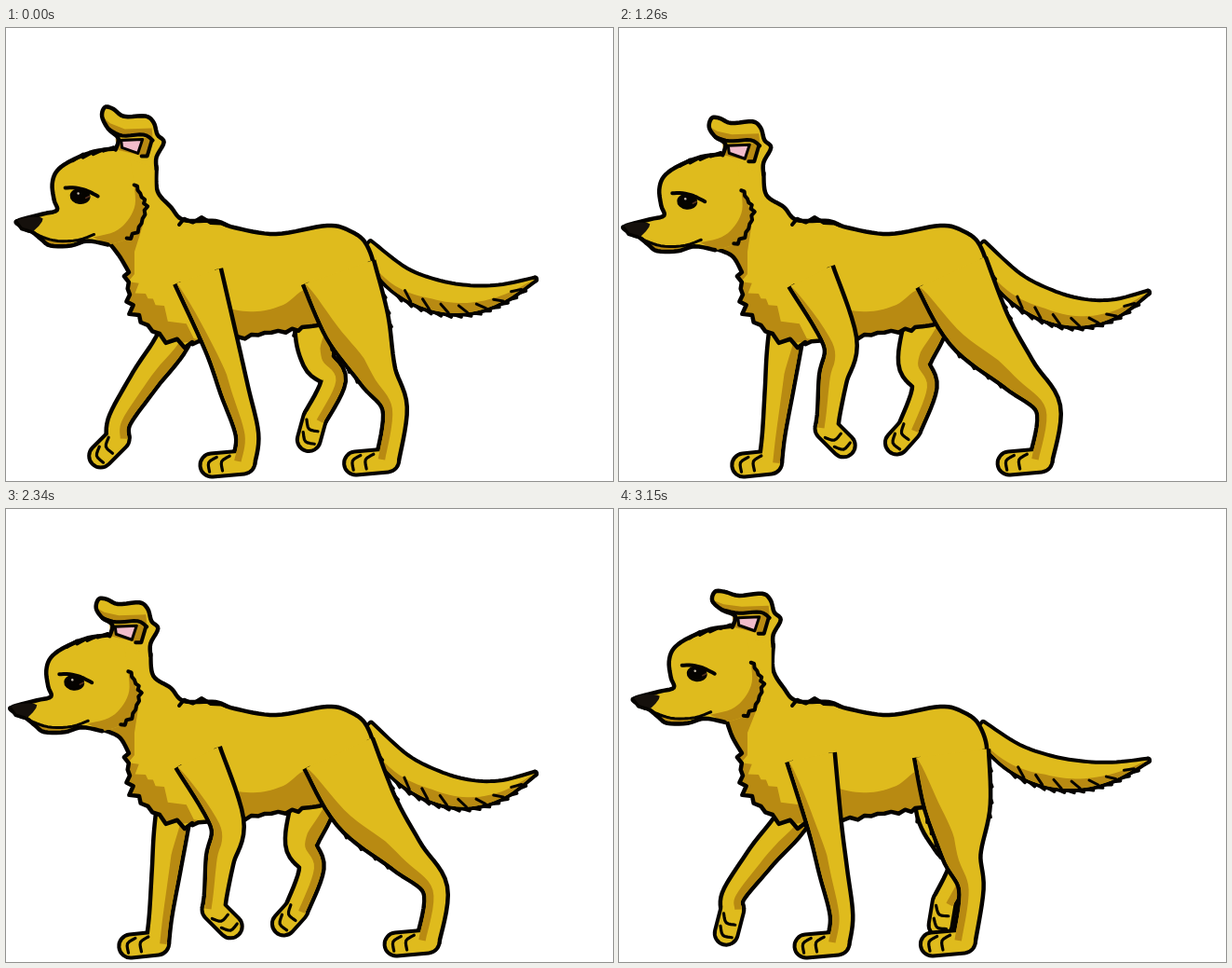
Write an HTML page with a canvas that moves like this. It is 652 px wide and 486 px high and loops after 3.24 s.

```html
<!DOCTYPE html>
<html lang="en">
<head>
<meta charset="utf-8">
<title>Walking dog</title>
<style>
html, body { margin: 0; width: 100%; height: 100%; overflow: hidden; background: #fff; }
canvas { display: block; }
</style>
</head>
<body>
<canvas id="stage" width="652" height="486"></canvas>
<script>
const ctx = document.getElementById('stage').getContext('2d');
const GOLD = '#dfbb1d', SHADE = '#b88a12', INK = '#050300', PINK = '#f2bccb';
const STEP = 90, CYCLE = 12, FRAMES = 36;
const { PI, sin, cos } = Math;

// Cosine that peaks at the given step of the walk.
const wave = (k, peak, period = CYCLE) => cos(2 * PI * (k - peak) / period);

// Five steps on the ground, seven in the air.
function gait(k, landing) {
  const p = (k - landing + CYCLE) % CYCLE;
  const air = Math.max(0, (p - 5) / 7);
  return { ground: p, air, lift: sin(PI * air) ** 0.6, curl: sin(PI * air ** 0.55) };
}

function footTip([x, y], lift, angle) {
  const length = 34 - 12 * lift;
  return [x - length * cos(angle), y + 3 + length * sin(angle)];
}

function frontLeg(k) {
  const { ground, air, lift, curl } = gait(k, 7);
  const reach = sin(PI * air * air);
  const x = air ? 255 - 100 * air * air * (3 - 2 * air) - 48 * reach : 155 + 20 * ground;
  const heel = [x, 466 - 42 * lift];
  const elbow = [215 + 23 * wave(k, 1.5), 340 - 18 * reach];
  const wrist = [x + 4 - 2 * lift, heel[1] - 30 + 15 * lift];
  const knee = [(elbow[0] + wrist[0]) / 2 - 5 * reach, (elbow[1] + wrist[1]) / 2 + 5 * reach];
  return [[206, 266], elbow, knee, wrist, heel, footTip(heel, lift, 2.45 * curl)];
}

function hindLeg(k) {
  const { ground, air, lift, curl } = gait(k, 9.5);
  const x = air ? 455 - 158 * sin(1.8 * air) : 300 + 155 * sin(PI * ground / 10);
  const heel = [x, 464 - 45 * lift];
  return [[357, 262], [356 + 30 * wave(k, 1.5), 320], [368 + 60 * wave(k, 2), 370 - 14 * lift],
    [x + 8 + 25 * lift, 408 - 30 * lift], heel, footTip(heel, lift, 1.3 * curl)];
}

// The far pair walks half a cycle later with a shorter stride.
const farSide = (leg, k, pivot, stride) =>
  leg((k + CYCLE / 2) % CYCLE).map(([x, y]) => [pivot + (x - pivot) * stride, y]);

// Catmull-Rom through points of any dimension.
function spline(p, n = 8) {
  const out = [];
  for (let i = 0; i < p.length - 1; i++) {
    const a = p[i - 1] || p[i], b = p[i], c = p[i + 1], d = p[i + 2] || c;
    for (let s = 0; s < n; s++) {
      const t = s / n;
      out.push(b.map((v, j) => v + 0.5 * t * (c[j] - a[j] +
        t * (2 * a[j] - 5 * v + 4 * c[j] - d[j] + t * (3 * (v - c[j]) + d[j] - a[j])))));
    }
  }
  out.push(p[p.length - 1]);
  return out;
}

function direction(p, i) {
  const a = p[Math.max(0, i - 1)], b = p[Math.min(p.length - 1, i + 1)];
  const x = b[0] - a[0], y = b[1] - a[1], l = Math.hypot(x, y) || 1;
  return [x / l, y / l];
}

function shifted(p, i, d) {
  const [x, y] = direction(p, i);
  return [p[i][0] - y * d, p[i][1] + x * d];
}

function jagged(pts, len, n = 5) {
  const p = spline(pts, n);
  return p.map((q, i) => i % 2 ? shifted(p, i, len * (0.7 + 0.5 * sin(i * 2.3))) : q);
}

function trace(p) {
  ctx.beginPath();
  p.forEach(q => ctx.lineTo(q[0], q[1]));
}
function fill(p, color) {
  trace(p);
  ctx.fillStyle = color;
  ctx.fill();
}
function line(p, w = 4.5, color = INK, cap = 'round') {
  trace(p);
  ctx.lineCap = cap;
  ctx.lineWidth = w;
  ctx.strokeStyle = color;
  ctx.stroke();
}

function ribbon(joints, widths) {
  const mid = spline(joints.map((q, i) => [q[0], q[1], widths[i]]));
  const side = f => mid.map((q, i) => shifted(mid, i, f(q[2], i / mid.length)));
  const taper = (w, s) => w * (1 - 0.75 * Math.min(1, s * 2.6));
  return {
    mid,
    front: side(w => w),
    back: side(w => -w),
    frontShade: side(taper),
    backShade: side((w, s) => -taper(w, s))
  };
}
const band = (a, b) => [...a, ...b.slice().reverse()];

function tufts(edge, from, to, sign, len = 6) {
  for (let i = from; i <= to; i += 2) {
    const [x, y] = direction(edge, i), [px, py] = edge[i];
    line([[px - x * 5, py - y * 5],
      [px + x * len - y * sign * 4, py + y * len + x * sign * 4]], 3.5);
  }
}

function toes([hx, hy], [tx, ty]) {
  const l = Math.hypot(tx - hx, ty - hy) || 1, x = (tx - hx) / l, y = (ty - hy) / l;
  const at = (a, b) => [tx + x * a - y * b, ty + y * a + x * b];
  for (const k of [1, -13])
    line(spline([at(k - 7, 8), at(k + 2, 3), at(k + 2, -7)], 4), 3.2);
}

function drawLeg(joints, widths, near, hind) {
  const r = ribbon(joints.slice(0, 5), widths);
  const foot = joints.slice(4);
  line(r.front, 9, INK, 'butt');
  line(r.back, 9, INK, 'butt');
  line(foot, 29);
  if (hind) tufts(r.front, near ? 9 : 3, near ? 15 : 9, 1);
  if (hind && near) tufts(r.back, 3, 9, -1);
  fill(band(r.front, r.back), GOLD);
  line(foot, 21, GOLD);
  fill(near ? band(r.front, r.frontShade) : band(r.back, r.backShade), SHADE);
  toes(...foot);
}

function drawTail(k) {
  const joints = [], widths = [];
  for (let i = 0; i <= 5; i++) {
    const s = i / 5;
    const sway = i ? (6 + 14 * s) * wave(k, 1.5 + 4 * s) : 0;
    joints.push([386 + 182 * s, 236 + 53 * s + 126 * s * (1 - s) + sway]);
    widths.push(8 * (1 - s) + 11 * sin(PI * s));
  }
  const r = ribbon(joints, widths);
  line(r.front, 8);
  line(r.back, 8);
  tufts(r.front, 9, 35, 1, 9);
  fill(band(r.front, r.back), GOLD);
  fill(band(r.front, r.frontShade), SHADE);
  for (let i = 12; i < 38; i += 4) {
    const [ax, ay] = r.front[i], [bx, by] = r.mid[i - 4];
    line([[ax, ay], [ax * 0.5 + bx * 0.5, ay * 0.5 + by * 0.5]], 3);
  }
}

function drawBody(hx, hy) {
  const back = spline([[162 + hx, 148 + hy], [163 + hx * 0.7, 174 + hy * 0.7], [177, 192], [191, 206],
    [225, 207], [245, 214], [290, 221], [345, 212], [370, 218],
    [387, 232], [395, 262], [380, 295], [345, 316], [318, 321]]);
  const belly = jagged([[318, 321], [285, 326], [248, 331], [200, 337]], -3);
  const chest = jagged([[200, 337], [165, 328], [143, 308], [133, 286], [132, 262]], -7, 4);
  const neck = spline([[132, 262], [122, 245], [112 + hx, 230 + hy]]);
  const all = [...back, ...belly, ...chest, ...neck];
  fill(all, GOLD);
  ctx.save();
  trace(all);
  ctx.clip();
  fill([[108 + hx, 226 + hy], [149 + hx, 205 + hy], [138, 240],
    ...jagged([[138, 264], [150, 285], [170, 298], [215, 335]], 9, 4), [120, 345]], SHADE);
  fill(spline([[222, 290], [240, 301], [270, 304], [298, 297], [325, 282], [340, 330], [220, 350]]), SHADE);
  ctx.restore();
  line(all);
  line(jagged([[186, 211], [210, 208], [238, 212]], -5, 3), 4);
}

function drawEar(ex, ey) {
  const p = (x, y, f) => [x + ex * f, y + ey * f];
  const rim = spline([[118, 129], [121, 117], p(110, 106, 0.5), p(103, 92, 1), p(106, 82, 1),
    p(115, 84, 0.8), p(127, 93, 0.25), [150, 93], [159, 100], [163, 113], [170, 121],
    [162, 137], [162, 150]], 5);
  const flap = spline([p(110, 106, 0.5), [125, 114], [148, 113], [158, 119]], 5);
  const pink = [[124, 119], [147, 118], [142, 133], [125, 127]];
  fill([...rim, [135, 140]], GOLD);
  fill([[118, 117], [157, 116], [152, 137], [119, 129]], SHADE);
  fill(pink, PINK);
  line([...pink, pink[0]], 3);
  fill(band([p(103, 92, 0.9), p(112, 100, 0.5), [128, 107], [157, 106], [158, 117]], flap), SHADE);
  line(flap, 4);
  line([[157, 119], [152, 136], [146, 136]], 4);
  line(rim);
}

function ellipse(x, y, rx, ry, color) {
  ctx.beginPath();
  ctx.ellipse(x, y, rx, ry, 0.1, 0, 2 * PI);
  ctx.fillStyle = color;
  ctx.fill();
}

function drawEye(closed) {
  if (closed) return line(spline([[70, 182], [82, 179], [97, 178]], 4), 3.5);
  ellipse(80, 179, 11, 8.5, INK);
  line(spline([[64, 170], [75, 170], [87, 173], [99, 179]], 4), 4);
  ellipse(78, 176, 1.3, 1.3, '#c9bfae');
  line([[86, 181], [90, 179]], 1.5, '#53301d');
}

function drawHead(ex, ey, closed) {
  const face = spline([[118, 128], [95, 131], [70, 141], [55, 152], [50, 166], [52, 183],
    [55, 194], [40, 198], [14, 205], [13, 209], [28, 217], [38, 225], [48, 232], [70, 232],
    [88, 227], [110, 231]], 5);
  const cheek = spline([[110, 231], [132, 224], [146, 208], [149, 192], [138, 167]], 5);
  const fold = spline([[138, 167], [139, 188], [131, 205], [117, 217], [94, 223]], 5);
  fill([...face, ...cheek, [140, 140]], GOLD);
  fill([[138, 167], [132, 128], [160, 125], [160, 182], [148, 195]], GOLD);
  fill([...cheek, ...fold], SHADE);
  fill([[35, 222], [48, 227], [72, 227], [68, 232], [47, 231]], SHADE);
  line(face);
  line(jagged([[130, 224], [143, 212], [149, 194], [146, 180], [138, 167]], 3, 4), 4);
  line(spline([[28, 217], [40, 223], [56, 227], [78, 226], [95, 220]], 4), 3);
  fill(spline([[10, 206], [20, 202], [40, 203], [27, 218], [14, 212], [10, 206]], 4), '#15100c');
  line([[11, 206], [17, 214], [27, 217]], 3.5);
  for (let i = 0; i < 4; i++)
    line([[72 + i * 11, 141 - i * 3.5], [83 + i * 11, 134 - i * 2.5]], 3.5);
  drawEar(ex, ey);
  drawEye(closed);
}

function draw(frame) {
  const k = frame % CYCLE;
  const nod = wave(k, 1.7, 6);
  const hx = -1.5 - 5.5 * nod, hy = 2.5 + 5 * nod;
  ctx.fillStyle = '#fff';
  ctx.fillRect(0, 0, 652, 486);
  ctx.lineJoin = 'round';
  drawLeg(farSide(hindLeg, k, 332, 0.61), [24, 21, 15, 11, 10], false, true);
  drawLeg(farSide(frontLeg, k, 93, 0.85), [18, 16, 13, 10, 10], false, false);
  drawTail(k);
  drawBody(hx, hy);
  drawLeg(hindLeg(k), [38, 33, 19, 11, 10], true, true);
  drawLeg(frontLeg(k), [24, 16, 13, 10, 10], true, false);
  ctx.save();
  ctx.translate(hx, hy);
  drawHead(-3 + 7 * wave(k, 1, 6), 8 + 8 * wave(k, 3.6, 6), frame >= 30 && frame <= 32);
  ctx.restore();
}

function tick() {
  draw(Math.floor(performance.now() / STEP) % FRAMES);
  requestAnimationFrame(tick);
}
tick();
</script>
</body>
</html>
```
